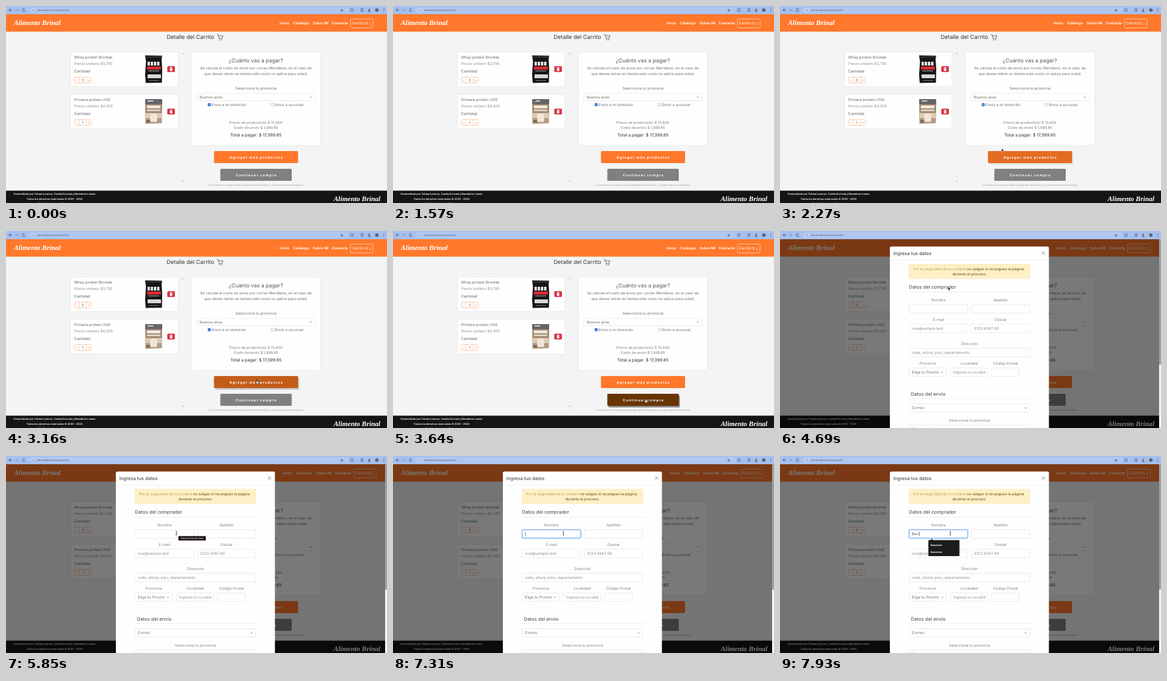
These frames come from a looping animation (600x311 px, 8 s). An HTML page with a canvas:

```html
<!DOCTYPE html>
<html lang="es">
<head>
<meta charset="utf-8">
<title>Detalle del Carrito</title>
<style>
html, body { margin: 0; width: 100%; height: 100%; overflow: hidden; background: #f5f5f5; }
canvas { display: block; width: 600px; height: 311px; }
</style>
</head>
<body>
<canvas id="stage" width="600" height="311"></canvas>
<script>
const ctx = document.getElementById('stage').getContext('2d');
ctx.textRendering = 'geometricPrecision';
const LOOP = 8000, MODAL_AT = 3700, TIP_AT = 5850, FOCUS_AT = 7310;
const ORANGE = '#ff782b', BROWN = '#683400', GREY = '#808080', LINE = '#e4e4e4';
const BRAND = 'Alimento Brinal';
const SANS = 'Inter, sans-serif';

// Linear interpolation through [time, ...values] keys.
function track(keys, t) {
  if (t <= keys[0][0]) return keys[0].slice(1);
  for (let i = 1; i < keys.length; i++) {
    const a = keys[i - 1], b = keys[i];
    if (t < b[0]) {
      const k = (t - a[0]) / (b[0] - a[0]);
      return a.slice(1).map((v, n) => v + (b[n + 1] - v) * k);
    }
  }
  return keys[keys.length - 1].slice(1);
}

const pointerPath = [
  [450, 520, 309], [640, 440, 255], [850, 330, 185], [1040, 250, 140], [1210, 221, 125],
  [1280, 221, 130], [1500, 222, 145], [1580, 222, 146], [1700, 209, 163], [1830, 262, 210],
  [1950, 335, 241], [2060, 346, 246], [2130, 348, 240], [2270, 349, 225], [2480, 362, 172],
  [2620, 376, 163], [2820, 392, 172], [2950, 393, 180], [3080, 394, 215], [3250, 396, 258],
  [3420, 397, 266], [3700, 398, 265], [3780, 396, 262], [3950, 362, 224], [4150, 305, 160],
  [4350, 264, 106], [4550, 253, 92], [4620, 255, 90], [4800, 280, 86], [4950, 297, 92],
  [5130, 281, 112], [5320, 268, 122]
];
const addHover = [[1920, 0], [2060, 1], [2130, 1], [2270, .18], [2340, 0], [3080, 0], [3150, .4], [3230, .4], [3360, 0]];
const payHover = [[3260, 0], [3450, 1], [3640, 1], [3700, .35], [3880, 0]];

function mix(a, b, k) {
  const part = (c, i) => parseInt(c.slice(i, i + 2), 16);
  return `rgb(${[1, 3, 5].map(i => Math.round(part(a, i) + (part(b, i) - part(a, i)) * k))})`;
}

function rect(x, y, w, h, color) {
  ctx.fillStyle = color;
  ctx.fillRect(x, y, w, h);
}

function box(x, y, w, h, fill, stroke, radius = 1.5, line = .7) {
  ctx.beginPath();
  ctx.roundRect(x, y, w, h, radius);
  if (fill) { ctx.fillStyle = fill; ctx.fill(); }
  if (stroke) { ctx.strokeStyle = stroke; ctx.lineWidth = line; ctx.stroke(); }
}

function stroke(points, color, width = .8) {
  ctx.beginPath();
  points.forEach(([x, y]) => ctx.lineTo(x, y));
  ctx.strokeStyle = color;
  ctx.lineWidth = width;
  ctx.stroke();
}

function shape(points, fill, outline) {
  ctx.beginPath();
  points.forEach(([x, y]) => ctx.lineTo(x, y));
  ctx.closePath();
  ctx.fillStyle = fill;
  ctx.fill();
  if (outline) { ctx.strokeStyle = outline; ctx.lineWidth = .7; ctx.stroke(); }
}

function disc(x, y, r, color) {
  ctx.beginPath();
  ctx.arc(x, y, r, 0, 7);
  ctx.fillStyle = color;
  ctx.fill();
}

function text(s, x, y, size = 5.8, color = '#707070', align = 'left', weight = 400, spacing = 0) {
  ctx.font = `${weight} ${size}px ${SANS}`;
  ctx.letterSpacing = spacing + 'px';
  ctx.textAlign = align;
  ctx.fillStyle = color;
  ctx.fillText(s, x, y);
  const width = ctx.measureText(s).width;
  ctx.letterSpacing = '0px';
  return width;
}
const centered = (s, x, y, size, color, weight, spacing) => text(s, x, y, size, color, 'center', weight, spacing);

function brand(x, y) {
  ctx.font = 'italic 700 11px "Liberation Serif", serif';
  ctx.textAlign = 'left';
  ctx.fillStyle = '#fff';
  ctx.fillText(BRAND, x, y);
}

function chevron(x, y, color = '#777') {
  stroke([[x - 1.6, y - .8], [x, y + .8], [x + 1.6, y - .8]], color);
}

function cart(x, y, s, color) {
  stroke([[x, y], [x + s * .2, y], [x + s * .4, y + s * .65], [x + s * .85, y + s * .65],
    [x + s, y + s * .2], [x + s * .28, y + s * .2]], color, s * .11);
  disc(x + s * .45, y + s * .88, s * .1, color);
  disc(x + s * .8, y + s * .88, s * .1, color);
}

function browserBar() {
  rect(0, 0, 600, 13, '#a5bfee');
  box(35, 1.5, 506, 10, '#b0c7f2', null, 5);
  const ink = '#3b475c';
  stroke([[9.5, 6.5], [5, 6.5], [7, 4.5], [5, 6.5], [7, 8.5]], ink, .7);
  stroke([[14.5, 6.5], [19, 6.5], [17, 4.5], [19, 6.5], [17, 8.5]], '#7f97bf', .7);
  ctx.beginPath();
  ctx.arc(28, 6.5, 2.2, .3, 5.5);
  ctx.lineWidth = .8;
  ctx.strokeStyle = ink;
  ctx.stroke();
  disc(43, 6.5, 2.8, '#d3e0f8');
  stroke([[41.5, 5.7], [44.5, 5.7]], ink, .6);
  stroke([[41.5, 7.5], [44.5, 7.5]], ink, .6);
  text('alimentobrinal.shop/carrito', 49, 8.2, 4, '#4d5568');
  centered('☆', 529, 8.6, 6, ink);
  box(542.5, 4.5, 4, 4, null, ink, 1);
  [4.3, 6.3, 8.3].forEach(y => stroke([[558.5, y], [563, y]], ink, .7));
  stroke([[572, 3.8], [572, 7.6], [570.3, 6], [572, 7.6], [573.7, 6]], ink);
  stroke([[569.8, 9], [574.2, 9]], ink);
  disc(584, 6.5, 2.8, '#5d6672');
  [4.3, 6.5, 8.7].forEach(y => disc(595, y, .6, ink));
}

function navbar(shift) {
  rect(0, 13, 600, 27.5, ORANGE);
  brand(12.5, 30);
  [['Inicio', 431], ['Catálogo', 452], ['Sobre Mí', 483], ['Contacto', 513]]
    .forEach(([label, x]) => text(label, x + shift, 29.3, 5.8, '#fff', 'left', 600));
  box(542.5 + shift, 20.5, 35.5, 14, null, '#ffe3d2', 2);
  text('Carrito', 545 + shift, 29.3, 5.9, '#fff');
  cart(565 + shift, 25.2, 4.6, '#fff');
  text('3', 571.5 + shift, 30, 4.8, '#fff');
}

function blackBag() {
  shape([[219, 78], [246, 78.5], [245, 84], [246, 99], [245.5, 121], [220, 121.5], [219, 108], [220.5, 88]], '#171717');
  rect(220, 80, 25, .8, '#555');
  [0, 1, 2, 3].forEach(i => rect(223 + i * 5, 88, 3.6, 6, '#eee'));
  rect(222, 95.5, 22, 5, '#d92c35');
  rect(224, 102, 17, 1, '#aaa');
  rect(223, 108, 21, 6, '#d8d8d8');
  rect(225, 117, 16, 1, '#777');
}

function beigeBag() {
  shape([[219, 147], [246, 147], [245.5, 185], [219.5, 186]], '#b39b82');
  rect(219.3, 147, 26.6, 8, '#65646a');
  rect(223, 149, 9, 2, '#cfcac5');
  rect(220, 155, 25.5, 14, '#a58a70');
  rect(222, 157, 21, 4.5, '#f0eae2');
  rect(222, 163.5, 21, 2.5, '#e4d9cc');
  rect(220, 169, 25.4, 8, '#dccbb7');
  box(227, 170, 11, 13, '#f0e5d7', null, 2);
  rect(221, 180, 6, 4, '#816952');
}

function product(y, name, price, count, drawBag) {
  box(101.5, y + .5, 169.5, 54.5, '#fefefe', LINE, 1.5);
  text(name, 107.3, y + 10.6, 5.9, '#666');
  text('Precio unitario $' + price, 107.3, y + 21.2, 5.8, '#8c8c8c');
  text('Cantidad', 107.3, y + 33, 6, '#666');
  box(107.7, y + 40.2, 26.6, 9.3, '#fefefe', '#ffb48c', 2.5);
  [115, 126.3].forEach(x => stroke([[x, y + 40], [x, y + 49.5]], '#ffb48c', .6));
  centered('-', 111.3, y + 46.6, 5.5, ORANGE);
  centered(count, 120.7, y + 47, 5.8, '#666');
  centered('+', 130.2, y + 46.6, 5.5, ORANGE);
  drawBag();
  box(254, y + 23, 12, 9.3, '#dc3545', null, 1.5);
  rect(257.7, y + 25.2, 4.6, .9, '#fff');
  rect(259, y + 24.5, 2, .8, '#fff');
  rect(258.2, y + 26.6, 3.6, 3.8, '#fff');
}

function button(label, x, y, w, fill, shadow) {
  if (shadow > 0) box(x + 1.8, y + 2.5, w, 19, `rgba(0,0,0,${.45 * shadow})`, null, 1.5);
  box(x, y, w, 19, fill, null, 1.5);
  centered(label, x + w / 2 + .5, y + 11.5, 5.4, '#fff', 700, 1.08);
}

function checkbox(x, label, on) {
  box(x, 153.7, 4.2, 4.2, on ? '#1769d8' : '#fff', on ? '#1769d8' : '#999', .7, .5);
  if (on) stroke([[x + .8, 155.8], [x + 1.8, 156.8], [x + 3.5, 154.6]], '#fff', .7);
  text(label, x + 6, 158);
}

function page(t) {
  const add = track(addHover, t)[0], pay = track(payHover, t)[0];
  const open = t >= MODAL_AT;
  rect(0, 13, 600, 298, '#f4f4f4');
  navbar(open ? 5 : 0);
  text('Detalle del Carrito', 253, 52, 8.8, '#333');
  cart(332, 45, 9.5, '#777');
  product(72, 'Whey protein Brontak', '3,700', '3', blackBag);
  product(139, 'Primera protein UVO', '4,300', '1', beigeBag);
  shape([[277.3, 75.5], [279.7, 75.5], [278.5, 74]], '#888');
  shape([[277.3, 276], [279.7, 276], [278.5, 277.6]], '#888');

  box(292, 72.5, 203.5, 147.5, '#fefefe', LINE, 1.5);
  centered('¿Cuánto vas a pagar?', 393.5, 88.8, 8.4, '#555');
  centered('Se calcula el costo de envio por correo Meridiano, en el caso de', 393.5, 99.6);
  centered('que desee retirar en tienda este costo no aplica para usted.', 393.5, 108.5);
  centered('Selecciona tu provincia', 393.5, 131.5, 5.9);
  box(300.5, 138, 186.5, 11.5, '#fefefe', LINE);
  text('Buenos aires', 305, 146, 5.9);
  chevron(480, 143.7);
  checkbox(318, 'Envío a mi domicilio', true);
  checkbox(417.5, 'Envío a sucursal', false);
  centered('Precio de producto(s) $ 15,400', 393.5, 185.7, 5.7, '#7c7c7c');
  centered('Costo de envio $ 1,999.85', 393.5, 194, 5.7, '#7c7c7c');
  centered('Total a pagar: $ 17,399.85', 393.5, 206, 6.7, '#2c2c2c');
  button('Agregar más productos', 327.5, 229, 132.5, mix(ORANGE, BROWN, add), add);
  button('Continuar compra', 337.5, 257, 112.5, mix(GREY, BROWN, pay), open ? 0 : pay);
  centered('Al continuar la compra estás aceptando los términos y condiciones de la empresa', 393.5, 283.5, 3.85, '#999');

  rect(0, 291.5, 600, 20, '#151515');
  centered('Desarrollado por Tobias Lurenco, Camila Dorvani y Benedicto Lomas', 76.5, 298, 3.9, '#fff', 600);
  centered('Todos los derechos reservados © 2023 - 2024', 76.5, 305.8, 3.9, '#fff', 600);
  centered('Ver términos y condiciones', 76.5, 313, 3.9, '#fff', 600);
  brand(516, 307.5);
}

function field(x, y, w, label, hint = '', select = false) {
  if (label) centered(label, x + w / 2, y - 5.3, 5.9, '#808080');
  box(x, y, w, 13.3, '#fefefe', LINE);
  ctx.save();
  ctx.beginPath();
  ctx.rect(x, y, w - (select ? 12 : 4), 14);
  ctx.clip();
  text(hint, x + 4.3, y + 8.7, 6, select ? '#707070' : '#909090');
  ctx.restore();
  if (select) chevron(x + w - 6.8, y + 6.8);
}

function modal() {
  rect(597, 13, 3, 298, '#f4f4f4');
  rect(597, 13, 3, 198, '#a0a0a0');
  box(173, 24.5, 250.5, 300, '#fefefe', null, 2.5);
  text('Ingresa tus datos', 178.5, 37.8, 7.4, '#333');
  stroke([[412.4, 32.4], [417.6, 37.6]], '#777', .7);
  stroke([[417.6, 32.4], [412.4, 37.6]], '#777', .7);
  rect(173, 45.7, 250.5, .6, LINE);
  box(203, 52.3, 190.5, 23, '#fdf0c6', '#faecc0');

  const lead = 'Por la seguridad de tu compra ', rest = 'no salgas ni recargues la página';
  const left = text(lead, 209.5, 61.6, 5.85, '#bba35a');
  text(rest, 209.5 + left, 61.6, 5.85, '#766328', 'left', 500);
  centered('durante el proceso.', 298.5, 70.2, 5.85, '#766328', 500);

  text('Datos del comprador', 203, 91.3, 7.5, '#444');
  rect(203, 96.3, 193, .6, LINE);
  field(203.3, 116.4, 92.3, 'Nombre');
  field(301.5, 116.4, 92, 'Apellido');
  field(203.3, 147, 92.3, 'E-mail', 'one@sample.test');
  field(301.5, 147, 92, 'Celular', '0123 4567 89');
  field(203.3, 185.3, 190.2, 'Dirección', 'calle, altura, piso, departamento');
  field(203.3, 216.3, 58.7, 'Provincia', 'Elige tu Provincia', true);
  field(268.5, 216.3, 59, 'Localidad', 'Ingresa tu Localidad');
  field(333.3, 216.3, 43.5, 'Código Postal');

  text('Datos del envío', 206, 259.6, 7.5, '#444');
  rect(203, 264.3, 193, .6, LINE);
  field(203.3, 272.5, 190.2, '', 'Correo', true);
  field(203.3, 306.2, 190.2, 'Selecciona tu provincia', 'Buenos aires', true);
}

function nameEntry(t) {
  const typed = 'Ben'.slice(0, t < 7650 ? 0 : t < 7800 ? 1 : t < 7930 ? 2 : 3);
  box(203.3, 116.4, 92.3, 13.3, '#fefefe', 'rgba(13,110,253,.25)', 2, 2.4);
  box(203.3, 116.4, 92.3, 13.3, null, '#86b7fe');
  const end = 207.6 + text(typed, 207.6, 125.2, 6, '#666');
  rect(end + .4, 119.7, .6, 6.6, '#333');
  if (t < 7380) return;

  const names = typed.length > 1 ? ['Benedicto', 'Benedicto']
    : typed ? ['Benedicto', 'Benedicto', 'Bernarda', 'Bruno', 'Belisario', 'Braulio']
    : ['Benedicto', 'Tobias', 'Camila', 'Benedicto', 'Bruno', 'Marcelino'];
  shape([[236.8, 133.2], [241.2, 133.2], [239, 130.8]], '#1c1c1c');
  box(233.6, 132.8, 49, 2.5 + names.length * 11.3, '#1c1c1c', null, 1.2);
  names.forEach((name, i) => text(name, 237.2, 141.6 + i * 11.1, 3.7, '#fff', 'left', 700));
}

function tooltip() {
  box(271.6, 126.5, 43, 6.8, '#0d1019', '#a5712f', .5, .6);
  centered('Please fill out this field', 293, 131.2, 3.2, '#dfe6f5', 700);
}

function pointer(t) {
  if (t < 450) return;
  const [x, y] = track(pointerPath, t);
  const open = t >= MODAL_AT;
  const over = (left, top, w) => !open && x > left && x < left + w && y > top && y < top + 19;
  if (open && t > 5200) {
    stroke([[x + .3, y - 2.8], [x + .3, y + 2.8]], '#222', .8);
    [-2.8, 2.8].forEach(d => stroke([[x - .8, y + d], [x + 1.4, y + d]], '#222', .6));
  } else if (over(327.5, 229, 132.5) || over(337.5, 257, 112.5)) {
    shape([[x - .5, y - 1], [x + .6, y - 1], [x + .8, y + 1.6], [x + 3.3, y + 2.2],
      [x + 3, y + 5.8], [x - .2, y + 5.8], [x - 2.2, y + 2.6], [x - .5, y + 3]], '#fff', '#111');
  } else {
    shape([[x, y], [x, y + 5.3], [x + 1.2, y + 4.2], [x + 2, y + 6], [x + 2.9, y + 5.6],
      [x + 2.2, y + 3.9], [x + 3.7, y + 3.8]], '#151515', 'rgba(255,255,255,.6)');
  }
}

function draw(now) {
  const t = now % LOOP;
  page(t);
  if (t >= MODAL_AT) {
    rect(0, 13, 600, 298, 'rgba(0,0,0,.52)');
    modal();
    if (t >= FOCUS_AT) nameEntry(t);
    else if (t >= TIP_AT) tooltip();
  }
  browserBar();
  pointer(t);
}

const start = performance.now();
function tick() {
  draw(performance.now() - start);
  requestAnimationFrame(tick);
}
tick();
</script>
</body>
</html>
```
